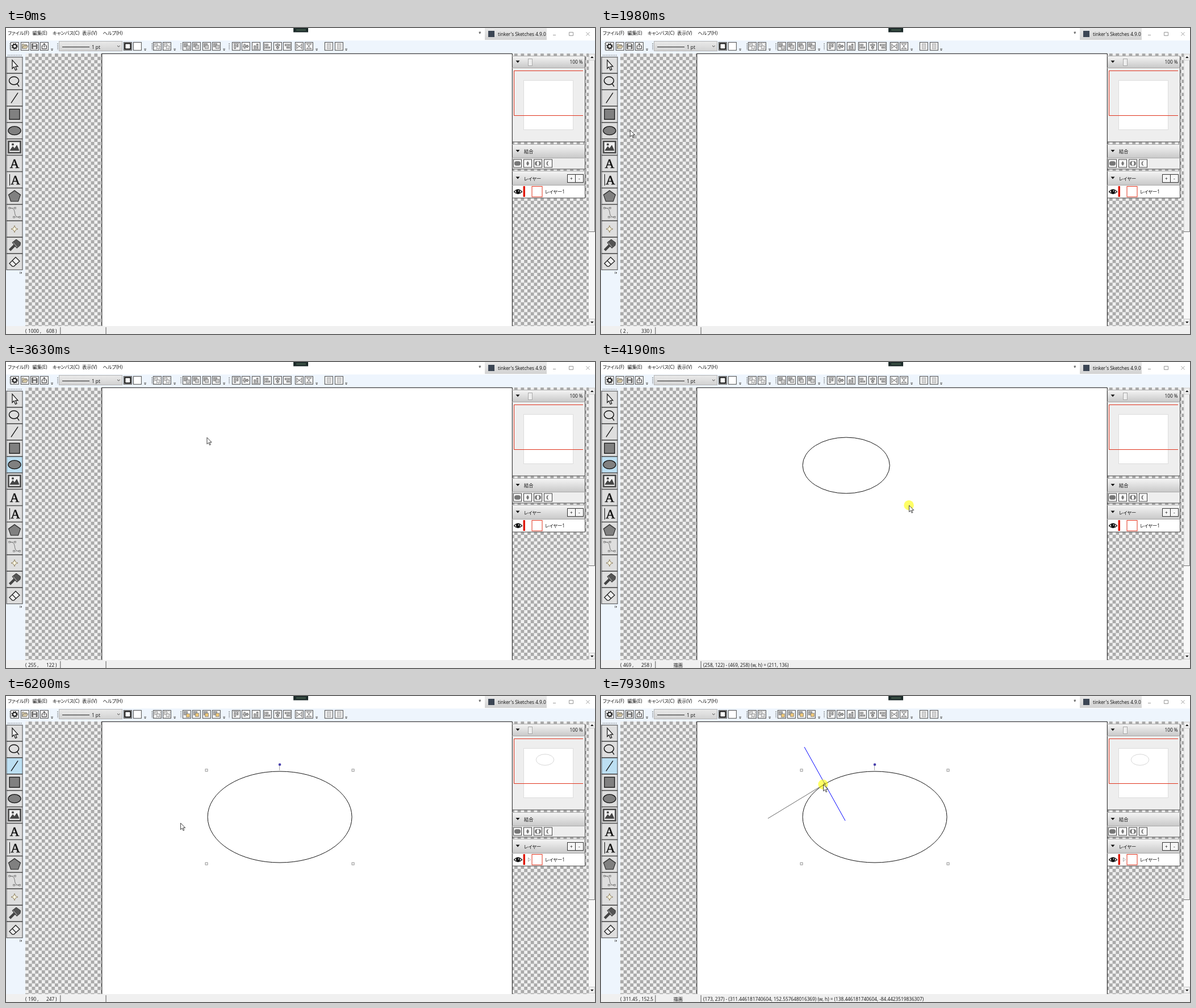
Recreate the animation shown at these times as an HTML page. Size 1037 by 540 pixels, loop 8000 ms.

```html
<!DOCTYPE html>
<html lang="ja">
<head>
<meta charset="utf-8">
<style>
html, body { margin: 0; width: 100%; height: 100%; overflow: hidden; background: #fff }
svg { display: block }
text { font: 8.26px "Open Sans", "Noto Sans CJK JP", sans-serif; font-feature-settings: "palt"; fill: #111; white-space: pre }
text.serif { font: 23px "Liberation Serif", serif; text-anchor: middle; stroke: #111; stroke-width: .5px }
</style>
</head>
<body>
<svg id="stage" width="1037" height="540" viewBox="0 0 1037 540"></svg>
<script>
const stage = document.getElementById('stage');
const rect = (x, y, w, h, fill, extra = '') => `<rect x="${x}" y="${y}" width="${w}" height="${h}" fill="${fill}" ${extra}/>`;
const path = (d, stroke = '#222', fill = 'none', width = 1) => `<path d="${d}" stroke="${stroke}" fill="${fill}" stroke-width="${width}"/>`;
const oval = (x, y, rx, ry, fill, extra = '') => `<ellipse cx="${x}" cy="${y}" rx="${rx}" ry="${ry}" fill="${fill}" ${extra}/>`;
const label = (x, y, s, extra = '') => `<text x="${x}" y="${y}" ${extra}>${s}</text>`;
const at = (x, y, inner) => `<g transform="translate(${x} ${y})">${inner}</g>`;
const turned = (angle, inner) => `<g transform="rotate(${angle})">${inner}</g>`;
const line = (s, width = 1) => `stroke="${s}" stroke-width="${width}"`;

// Small framed button, centred on x, y
const button = (x, y, inner) => at(x, y, rect(-7, -7, 14, 14, '#f8f8f8', line('#444')) + inner);

const gear = oval(0, 0, 3.4, 3.4, 'none', line('#222', 2)) +
  oval(0, 0, 4.8, 4.8, 'none', line('#222', 1.6) + ' stroke-dasharray="1.9 1.87"');
const stack = (dx, dy) => rect(-5, -5, 6, 6, '#aaa', line('#777', .8)) +
  `<rect class="tint" x="${-3 + dx}" y="${-3 + dy}" width="6" height="6" ${line('#777', .8)}/>`;
const group = rect(-4.5, -4.5, 5, 5, '#ddd', line('#888', .8)) + rect(-1, -1, 5, 5, '#e8e8e8', line('#888', .8)) +
  rect(-5.5, -5.5, 11, 11, 'none', line('#999', .7) + ' stroke-dasharray="2 2"');
const bar = (x, y, h) => rect(x, y, 2.5, h, '#ccc', line('#444', .7));
const alignBars = angle => turned(angle, path('M-5 -5H5', '#333', 'none', .8) + bar(-3.5, -3, 7) + bar(1, -3, 4));
const centreBars = angle => turned(angle, path('M-5.5 0H5.5', '#333', 'none', .8) + bar(-3.5, -3.5, 7) + bar(1, -2, 4));
const spread = angle => turned(angle, path('M-4.5 -5V5M4.5 -5V5M-4 -3L0 0L-4 3M4 -3L0 0L4 3', '#444', 'none', .8));
const tall = rect(-3, -4.5, 6.5, 9, '#d4d4d4', line('#aaa', .8));

const icons = [
  [15, gear],
  [33, path('M-5 4V-4H-2L-1 -3H3V-1M-5 4L-2.5 -1H5.5L3 4Z', '#666', '#d8cba8', .8)],
  [50, path('M-4.5 -4.5H3L4.5 -3V4.5H-4.5Z', '#444', '#777') + rect(-2.5, -4.5, 5, 3, '#eee') + rect(-2.5, 1, 5, 3.5, '#eee')],
  [67, path('M-2 -1H-4V4.5H4V-1H2M0 2V-5M-2.4 -2.5L0 -5L2.4 -2.5')],
  [214, rect(-5, -5, 10, 10, '#fff', line('#111', 2))],
  [231, rect(-6, -6, 12, 12, '#fff')],
  [266, group], [283, group],
  [318, stack(2, 2)], [335, stack(1, 1)], [353, stack(0, 1)], [370, stack(2, 1)],
  [405, alignBars(0)], [422, centreBars(0)], [440, alignBars(180)],
  [460, alignBars(-90)], [478, centreBars(90)], [495, alignBars(90)],
  [516, spread(0)], [533, spread(90)], [568, tall], [586, tall]
];

const star = 'M0 -6L1.7 -1.7L6 0L1.7 1.7L0 6L-1.7 1.7L-6 0L-1.7 -1.7Z';
const tools = [
  path('M-4 -9V6L-.8 3L1.5 9L4 8L1.7 2.3H6Z', '#111', '#f5f5f5', 1.2),
  oval(-1, -1.5, 8.5, 7, 'none', line('#111', 1.5)) + path('M4 4Q6 5 8 9', '#111', 'none', 1.5),
  path('M-6 9L6 -9', '#111', 'none', 1.3),
  rect(-9, -9, 18, 18, '#808080', line('#111', 1.3)),
  oval(0, 0, 11, 7.5, '#808080', line('#111', 1.3)),
  rect(-10.5, -10, 21, 20, '#eee', line('#444', 2.5)) +
    path('M-8 6L-3 -1L0 3L4 -3L8 6Z', '#444', '#444') + oval(-3, -4.5, 2, 2, '#444'),
  label(0, 8, 'A', 'class="serif"'),
  label(1.5, 8, 'A', 'class="serif"') + path('M-8.5 -10V10', '#111'),
  path('M0 -10L10.5 -2.5L6.5 9H-6.5L-10.5 -2.5Z', '#333', '#808080', 1.3),
  path('M-8 -8C6 -8 -5 8 8 8', '#555', 'none', .8) + path('M-8 -8H1M-1 8H8', '#777', 'none', .6) +
    [[-9, -8], [1, -8], [-1, 8], [9, 8]].map(([x, y]) => rect(x - 1.2, y - 1.2, 2.4, 2.4, '#eee', line('#555', .7))).join(''),
  path(star, '#776644', '#fffbe6', .8),
  path('M-8.5 8.5L0 0', '#444', 'none', 4.5) + path('M-4 -5L3 -10.5L10.5 -5L10 0L4 5Z', '#333', '#555') +
    path('M-2.5 -5L4.5 3', '#ccc', 'none', 1),
  path('M-9 3L2 -8L9 -1L-1 8H-4ZM-4 -2L3 5', '#222', '#eee', 1.3)
];

const header = (y, h) => rect(891.5, y, 128, h, 'url(#metal)') +
  path(`M897.5 ${y + h / 2 - 2}h7l-3.5 4z`, 'none', '#111');
const panel = (y, h, head, fill) => rect(891, y, 129, h, fill) + header(y, head) +
  path(`M891.5 ${y}V${y + h}H1019.5V${y}`, '#444') + path(`M891 ${y + .5}H1020M891 ${y + head + .5}H1020`, '#aaa');
const lobes = oval(-1.5, 0, 4, 4, '#777') + oval(1.5, 0, 4, 4, '#777');
const merge = [
  lobes,
  path('M0 -4Q4.5 0 0 4Q-4.5 0 0 -4Z', 'none', '#777'),
  lobes + oval(0, 0, 2, 3.5, '#fff'),
  path('M1 -4A4 4 0 1 0 1 4Q-3 0 1 -4Z', 'none', '#777')
];

const toolY = i => 65.5 + i * 28.92;
const grips = [7, 91, 257, 308, 393, 562]
  .map(x => `<path d="M${x} 27V39" ${line('#555', 1.2)} stroke-dasharray="1.4 1.5"/>`).join('');
const overflows = [81, 245, 297, 384, 547, 599].map(x => path(`M${x - 2} 36.5h4M${x - 1.5} 38.3h3l-1.5 1.6z`, '#555', '#555', .7)).join('');
const handles = [[353, 131], [611, 131], [353, 296], [611, 296]]
  .map(([x, y]) => rect(x - 2, y - 2, 4, 4, '#fff', line('#777', .8))).join('');

const CELL = 8 * .7222;
stage.innerHTML = `
<defs>
  <pattern id="checks" x="34" y="45" width="${2 * CELL}" height="${2 * CELL}" patternUnits="userSpaceOnUse">
    ${rect(0, 0, 2 * CELL, 2 * CELL, '#f0f0f0') + rect(CELL, 0, CELL, CELL, '#aaa') + rect(0, CELL, CELL, CELL, '#aaa')}
  </pattern>
  <linearGradient id="metal" x2="0" y2="1"><stop stop-color="#f6f6f6"/><stop offset="1" stop-color="#c9c9c9"/></linearGradient>
  <linearGradient id="chip" x2="0" y2="1"><stop stop-color="#eaeaea"/><stop offset="1" stop-color="#d2d2d2"/></linearGradient>
</defs>
${rect(0, 0, 1037, 540, '#fff') + rect(0, 22, 1037, 23, '#eef5fd') + rect(0, 45, 34, 481, '#eef5fd')}
${rect(34, 45, 992, 481, 'url(#checks)')}
${rect(169, 45, 722, 482, '#fff') + path('M168.8 526V45.3H891.3V526', '#111')}
${[[3, 'ファイル(F)'], [46.5, '編集(E)'], [82, 'キャンバス(C)'], [134, '表示(V)'], [170.5, 'ヘルプ(H)']].map(([x, s]) => label(x, 12, s)).join('')}
${rect(506, 0, 26, 7.5, '#1d2b2a') + path('M511 3.5H528', '#47604f', 'none', 2)}
${label(832, 13, '*') + rect(843, 0, 109, 21, 'url(#chip)') + rect(849, 5, 11, 11, '#3c4654')}
${label(866, 14, 'tinker\'s Sketches 4.9.0')}
${path('M963 12.5H968M991.5 7.5H998.5V13.5H991.5ZM1021.5 7.5L1027.5 13.5M1027.5 7.5L1021.5 13.5', '#999')}
${grips}${overflows}
${rect(93.5, 23.5, 111, 17, 'url(#chip)', line('#b4b4b4')) + path('M99 33.5H147', '#222') + label(151, 36.5, '1 pt') + path('M196 31L198.3 33.3L200.6 31', '#444')}
${icons.map(([x, icon]) => button(x + .3, 32.3, icon)).join('')}
<path d="M3 48H28" ${line('#555', 1.2)} stroke-dasharray="1.4 1.5"/>
${tools.map((icon, i) => at(15, toolY(i), `<rect class="tool" x="-14" y="-14.2" width="28" height="28.4" stroke="#444"/>` + icon)).join('')}
${path('M24.5 430V434M26.5 430.5V433.5L28 432Z', '#555', '#555', .7)}

${panel(49, 152, 21, '#eee')}
${rect(919.5, 54.5, 7, 12, '#eee', line('#aaa')) + label(992.5, 63, '100 %')}
${rect(911.5, 92.5, 87, 87, '#fff', line('#ddd'))}
<ellipse id="mini" cx="949" cy="112.5" rx="15.7" ry="9.8" fill="none" ${line('#bbb', .6)}/>
${path('M1016 75.5H894.5V154.5H1016', '#e0321c')}
${panel(205, 44, 24, '#eee')}${label(912, 220.5, '結合')}
${merge.map((m, i) => button(900.5 + i * 18, 239, m)).join('')}
${panel(252, 48, 25, '#fff')}${label(912, 268.5, 'レイヤー')}
${rect(988.5, 258.5, 14, 14, '#f6f6f6', line('#333')) + rect(1002.5, 258.5, 14, 14, '#f6f6f6', line('#333'))}
${label(993, 268.5, '+') + label(1008, 268.5, '-')}
${path('M894.5 289Q901.5 281 908.5 289Q901.5 296 894.5 289Z', '#111', '#fff', 1.2) + oval(901.5, 288.5, 3.7, 3.7, '#111') + oval(902.5, 287.5, 1, 1, '#fff')}
${rect(910.5, 279, 3.5, 19, '#e01b0c') + rect(926, 279.5, 18, 18.5, '#fff', line('#e0321c'))}
<path id="expander" d="M919.5 285.5V292L923.5 288.8Z" fill="#fff" ${line('#999', .8)}/>
${label(949, 292, 'レイヤー1')}

${rect(1026, 45, 11, 481, '#f8f8f8') + rect(1026.5, 46, 10, 10.5, '#f0f0f0', line('#ccc')) + rect(1026.5, 57, 10, 302.5, '#f0f0f0', line('#ddd'))}
${path('M1026 359.5H1036.5V57', '#777') + rect(1026.5, 513.5, 10, 11, '#f0f0f0', line('#ccc'))}
${path('M1029 53L1031.8 50L1034.6 53ZM1029 518L1031.8 521L1034.6 518Z', 'none', '#111')}
${rect(0, 526, 1037, 14, '#f0f0f0') + path('M95.8 528V540M176 528V540', '#333', 'none', .8)}
${label(34, 537.5, '(')}
<text id="cx" x="39" y="537.5"></text><text id="cy" x="71" y="537.5"></text><text id="close" x="87" y="537.5">)</text>
<text id="mode" x="127.5" y="537.5">描画</text><text id="detail" x="180" y="537.5"></text>

<ellipse id="shape" fill="none" stroke="#111"/>
<g id="frame">${path('M481.5 122V131', '#999', 'none', .8) + oval(482, 121, 2.3, 2.3, '#4b43ae') + handles}</g>
<path id="normal" d="M358 90L430 220" stroke="#00f"/>
<path id="stroke" ${line('#444', .8)}/>
<circle id="snap" cx="393.9" cy="155.1" r="2" fill="#1c1499"/>
<g id="pointer"><circle id="press" r="8.7" fill="#ff0" opacity=".6"/>
${path('M.5 .3V11.8L3.2 9.3L5.1 13.6L6.8 12.8L5 8.7H8.7Z', '#111', '#fff', .8)}</g>`;

const el = Object.fromEntries([...stage.querySelectorAll('[id]')].map(e => [e.id, e]));
const show = (e, on) => e.setAttribute('visibility', on ? 'visible' : 'hidden');
const set = (e, attrs) => { for (const k in attrs) e.setAttribute(k, attrs[k]); };

const SCALE = .722, LEFT = 169, TOP = 45, LAG = 70;
const toPage = ([x, y]) => [Math.round((x - LEFT) / SCALE), Math.round((y - TOP) / SCALE)];

// Pointer route: time, x, y
const route = [
  [610, 975, 500], [690, 891, 484], [900, 590, 420], [1150, 170.5, 283.3], [1360, 98, 222], [1780, 57, 180],
  [1980, 51, 180], [2200, 19, 180], [2600, 19, 181], [2730, 24, 184], [2800, 32, 183], [3300, 290, 142], [3560, 353.4, 133],
  [3770, 353.4, 133], [4000, 450, 196], [4330, 609, 294], [4520, 609, 294], [4820, 429.6, 260.9], [4890, 313, 240],
  [5030, 125, 178], [5240, 22, 124], [5650, 18, 122], [5900, 150, 195], [6060, 264, 225], [6130, 306.2, 223.3],
  [6200, 307, 224], [6400, 293.9, 216.1], [6720, 293.9, 216.1], [6880, 322, 200], [6950, 327.8, 198],
  [7020, 338, 192], [7300, 391, 156]
];
function pointerAt(t) {
  const i = route.findIndex(k => k[0] > t);
  if (i === 0) return route[0].slice(1);
  if (i < 0) return route.at(-1).slice(1);
  const [a, b] = [route[i - 1], route[i]], f = (t - a[0]) / (b[0] - a[0]);
  return [a[1] + (b[1] - a[1]) * f, a[2] + (b[2] - a[2]) * f];
}
// The readout keeps the last place the pointer had over the page
function readout(t) {
  for (let s = Math.floor((t - LAG) / 10) * 10; s >= 610; s -= 10) {
    const p = pointerAt(s);
    if (p[0] >= LEFT && p[0] <= 891) return toPage(p);
  }
  return [1000, 608];
}

function draw(t) {
  const sizing = t >= 3770 && t < 4470, done = t >= 4470;
  const lining = t >= 6500, snapped = t >= 7370;
  const [x, y] = pointerAt(t), late = pointerAt(t - LAG), [px, py] = readout(t);

  show(el.pointer, t >= 610);
  el.pointer.setAttribute('transform', `translate(${x} ${y})`);
  show(el.press, sizing || lining);

  const tool = t >= 5400 ? 2 : t >= 2350 ? 4 : -1;
  stage.querySelectorAll('.tool').forEach((e, i) => e.setAttribute('fill', i === tool ? '#bcdff2' : '#dedede'));
  stage.querySelectorAll('.tint').forEach(e => e.setAttribute('fill', done ? '#efc878' : '#ccc'));

  const [ex, ey] = done ? [609, 294] : [Math.max(355, late[0]), Math.max(133, late[1])];
  set(el.shape, { cx: (355 + ex) / 2, cy: (133 + ey) / 2, rx: (ex - 355) / 2, ry: (ey - 133) / 2 });
  show(el.shape, sizing || done);
  for (const e of [el.frame, el.mini, el.expander]) show(e, done);

  const end = snapped ? [393.9, 155.1] : late;
  el.stroke.setAttribute('d', `M293.9 216.1L${end}`);
  show(el.stroke, lining);
  show(el.snap, t >= 6950);
  show(el.normal, snapped);

  el.cx.textContent = (snapped ? '311.45' : px) + ' ,';
  el.cy.textContent = snapped ? '152.5' : py;
  show(el.close, !snapped);
  show(el.mode, sizing || lining);
  const [sx, sy] = lining ? [173, 237] : [258, 122];
  el.detail.textContent = snapped
    ? '(173, 237) - (311.446181740604, 152.557648016369) (w, h) = (138.446181740604, -84.4423519836307)'
    : sizing || lining ? `(${sx}, ${sy}) - (${px}, ${py}) (w, h) = (${px - sx}, ${py - sy})` : '';
}

const start = performance.now();
function tick() {
  draw((performance.now() - start) % 8000);
  requestAnimationFrame(tick);
}
tick();
</script>
</body>
</html>
```
